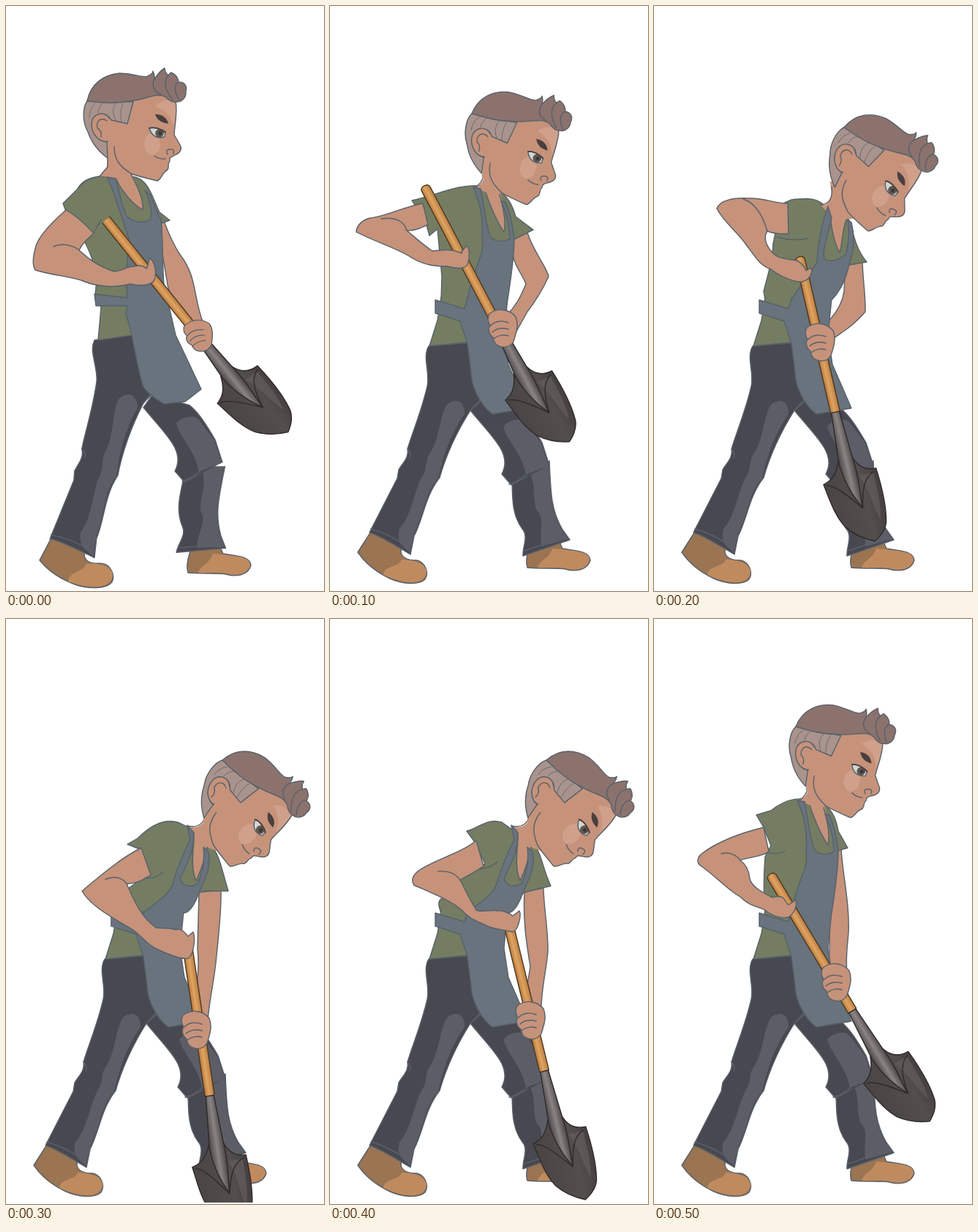
An HTML page without scripts that plays this animation: 435 px wide and 800 px high, repeating every 600 ms.

```html
<!DOCTYPE html>
<html lang="en">
<head>
<meta charset="utf-8">
<title>Digging man</title>
<style>
html, body { margin: 0; width: 100%; height: 100%; overflow: hidden; background: #fff; }
svg { display: block; width: 100vw; height: 100vh; }
path, rect { stroke: #57616a; stroke-width: 1.4; stroke-linejoin: round; stroke-linecap: round; }
.skin { fill: #c6927a; }
.shirt { fill: #747d62; }
.apron { fill: #68737d; }
.dark { fill: #484850; }
.lite { fill: #5d5d67; }
.boot { fill: #9b7452; }
.toe { fill: #c08a5f; }
.line { fill: none; }
.thin { stroke-width: .7; }
.lid { stroke: #4a3f3f; stroke-width: 1.8; }
.iron { stroke: #2f2a2a; }
.stick { stroke: #4a3823; }
.flat { stroke: none; }
.pose { visibility: hidden; animation: show .6s step-end infinite; animation-delay: calc((var(--i) - 6) * 100ms); }
@keyframes show {
  0% { visibility: visible; }
  16.66%, 100% { visibility: hidden; }
}
</style>
</head>
<body>
<svg viewBox="0 0 435 800" preserveAspectRatio="none">
<defs>
  <linearGradient id="wood">
    <stop offset="0" stop-color="#b9783c"/><stop offset=".45" stop-color="#dfa563"/><stop offset="1" stop-color="#bd7d40"/>
  </linearGradient>
  <linearGradient id="shaft">
    <stop offset="0" stop-color="#4a4545"/><stop offset=".5" stop-color="#8b8484"/><stop offset="1" stop-color="#494343"/>
  </linearGradient>
  <linearGradient id="steel">
    <stop offset="0" stop-color="#4a4545"/><stop offset=".7" stop-color="#534d4c"/><stop offset="1" stop-color="#453f3f"/>
  </linearGradient>

  <g id="head">
    <path class="skin flat" d="M135 150L168 120H228L232 130C235 145 231 160 230 176L238 190C241 195 239 200 233 203C228 206 223 206 224 212C220 216 224 219 221 224C213 228 213 237 207 239C195 236 180 233 169 229L140 212Z"/>
    <path class="flat" fill="#d0a08b" d="M204 137C212 129 222 127 231 130C234 145 231 155 229 166C226 150 218 143 204 137Z"/>
    <ellipse cx="200" cy="189" rx="11" ry="15" fill="#d0a08b"/>
    <path class="line" d="M232 130C235 145 231 160 230 176L238 190C241 195 239 200 233 203C228 206 223 206 224 212C220 216 224 219 221 224C213 228 213 237 207 239C195 236 180 233 171 229C155 219 148 210 148 192"/>
    <path fill="#a9938c" d="M111 130C104 140 105 160 112 172C118 190 128 200 139 208L138 186C125 185 115 172 118 156C124 146 136 146 141 152L144 156L166 161L174 131Z"/>
    <path class="line thin" d="M122 133q-8 7-8 20M132 133q-6 6-6 13M150 133q-7 10 0 23M160 133q-5 12-2 25"/>
    <path class="skin" d="M141 153C133 143 119 147 117 160C116 175 128 187 139 185"/>
    <path class="line" d="M138 157C129 151 123 158 125 167C129 169 131 174 130 179"/>
    <path fill="#8b726d" d="M111 130C116 105 135 94 155 92C175 92 188 99 194 96C199 93 201 92 201 89C204 94 203 97 203 100C207 94 211 88 217 85C217 90 220 93 222 95Q224 92 226 91C235 95 236 102 236 104C245 104 248 110 246 117C247 126 239 132 233 131C226 133 221 127 218 124C205 118 195 127 170 130C150 134 125 132 111 130Z"/>
    <path class="line" d="M203 100C198 112 205 118 212 121M222 95C214 105 220 118 228 128M236 104C229 108 231 120 237 128"/>
    <path class="flat" fill="#4a3f3f" d="M204 148C213 148 220 152 222 161C214 160 207 157 204 148Z"/>
    <path fill="#d5d6d2" d="M196 167C201 165 212 168 218 172L217 179C206 182 199 177 196 167Z"/>
    <circle cx="210" cy="174" r="5.8" fill="#5d5650"/><circle cx="211" cy="174" r="2.4" fill="#3a3635"/>
    <path class="line lid" d="M196 167C203 165 212 168 218 173"/>
    <path class="line" d="M221 203q-4-6 3-7q7-1 5 6M203 205q7 5 15 4"/>
  </g>

  <g id="shovel">
    <rect class="stick" x="-6.500" y="0" width="13" height="221" rx="5" fill="url(#wood)"/>
    <path class="iron" fill="url(#steel)" d="M-38 311C-26 308 -18 302 -11 284H9C14 299 25 305 37 305C39 330 39 360 34 380C30 392 20 398 13 402C0 396 -12 388 -22 374C-33 355 -34 335 -38 311Z"/>
    <path class="flat" fill="#6a6261" opacity=".6" d="M12 310L32 310C32 335 33 355 27 375C20 350 22 330 12 310Z"/>
    <path class="iron" fill="url(#shaft)" d="M-5.500 218H5.500L9 285C12 310 8 330 7 354C-2 335 -9 318 -11 290Z"/>
    <path class="line iron" d="M-34 313C-22 316 -8 335 7 354M33 309C18 314 12 330 7 354"/>
  </g>

  <g id="fist">
    <path class="skin" d="M-18 -20C-8 -28 8 -28 18 -16C23 -4 18 8 15 18C10 26 2 27 -5 24C-10 22 -12 18 -13 12C-19 8 -20 0 -17 -4C-21 -10 -20 -16 -18 -20Z"/>
    <path class="line" d="M-16 -4C-10 -11 0 -11 8 -8M-14 5C-7 -1 1 -1 8 1M-12 14C-6 9 2 8 8 10"/>
  </g>

  <g id="rear">
    <path class="boot" d="M60 712L54 722L38 747C50 765 65 775 82 783C100 791 122 792 130 784C136 775 130 760 118 758C108 758 98 755 97 746L100 730Z"/>
    <path class="toe flat" d="M73 778C75 764 95 768 98 757C115 757 133 763 132 775C128 792 105 792 73 778Z"/>
    <path class="dark" d="M135 465L196 460L205 520L207 540L192 553C175 580 160 610 150 645C130 670 128 700 115 725L110 750C90 738 70 725 54 720L92 646L94 634C100 624 108 618 106 606C112 585 125 555 133 520C137 500 126 480 135 465Z"/>
    <path class="lite flat" d="M160 545C172 535 185 540 184 558C165 585 155 615 148 646C130 665 130 690 115 722L109 748C100 738 90 735 95 715C110 700 115 665 125 645C135 632 128 622 138 610C150 590 150 560 160 545Z"/>
    <path class="line" d="M106 606q6 6 3 12M56 715q28 8 53 27M192 553l14-15"/>
  </g>

  <g id="shoe">
    <path class="boot" d="M275 728L272 742C268 755 268 762 270 768C290 770 310 768 322 770C335 774 352 772 356 758C355 745 335 745 318 742L310 724Z"/>
    <path class="toe flat" d="M284 768C288 756 300 756 304 742L318 743C335 746 355 745 355 758C350 772 335 772 322 769C308 767 296 769 284 768Z"/>
  </g>
  <g id="shin">
    <path class="dark" d="M300 622C302 670 303 690 318 716L328 730L264 752C263 740 272 725 263 715C248 695 250 670 249 652L246 635"/>
    <path class="lite flat" d="M267 630L299 622C302 670 302 690 317 716L326 729L290 739C285 720 295 700 283 690C275 670 285 650 267 630Z"/>
    <path class="line" d="M266 745q30-10 56-21"/>
  </g>
  <g id="thigh">
    <path class="dark" d="M271 643L248 655L235 640C250 612 222 590 192 553L205 535L255 550C268 560 280 580 290 597L300 628"/>
    <path class="lite flat" d="M237 575C245 565 262 562 268 570L289 598L299 629L268 641C262 610 245 600 237 575Z"/>
    <path class="line" d="M245 654q16-5 26-16"/>
  </g>
  <g id="legs"><use href="#shoe"/><use href="#shin"/><use href="#thigh"/><use href="#rear"/></g>

  <g id="waist">
    <path class="shirt" d="M152 398L147 430L136 465L188 460L205 398"/>
    <path class="apron" d="M188 400L184 414L144 402V420L178 431L188 462L193 500C193 520 205 545 222 558L270 550L244 490L238 450L243 400"/>
  </g>

  <g id="bib">
    <path class="skin flat" d="M208 200L212 225C212 237 208 242 200 248L213 255C220 275 228 295 238 309C241 295 238 275 232 250Z"/>
    <path class="line" d="M210 208C212 232 210 240 200 247M213 255C220 275 228 295 238 309C241 295 237 275 232 258"/>
    <path class="apron" d="M188 402C190 385 196 370 203 350C210 335 209 325 208 318C210 290 206 270 196 248L206 250C212 280 213 300 219 314C225 325 240 322 246 318C246 300 240 280 234 267L240 268C247 285 250 300 252 318C252 345 247 375 243 402"/>
  </g>
  <g id="bibLow">
    <path class="skin flat" d="M270 258L275 270C270 282 262 288 247 283L258 297C258 320 253 335 260 358C266 345 272 325 275 312L290 318V260Z"/>
    <path class="line" d="M272 265C273 280 262 286 248 283M256 297C256 320 252 338 260 358C266 345 273 325 275 312"/>
    <path class="apron" d="M188 402C200 390 222 380 228 362C236 335 245 315 252 302L248 282L257 292C258 315 248 335 238 355C242 368 255 366 262 362C270 345 272 330 270 312L277 318C282 340 270 360 264 374C258 392 250 402 243 402"/>
  </g>
  <use id="headMid" href="#head" transform="translate(83 17) rotate(10.500 111 130)"/>
  <use id="headLow" href="#head" transform="translate(185 63) rotate(37.500 111 130)"/>
</defs>

<g class="pose" style="--i:0">
  <path class="skin" d="M207 297L216 294C222 310 228 325 238 340C262 370 256 400 270 434L248 440C235 415 222 395 220 375L214 340Z"/>
  <use href="#shoe" transform="translate(-21 7)"/>
  <use href="#shin" transform="translate(-4 0) rotate(14 270 640)"/>
  <use href="#thigh" transform="translate(-4 -4)"/>
  <use href="#rear" transform="translate(121 457) rotate(-5) scale(1.04) translate(-135 -465)"/>
  <path class="shirt" d="M128 233C112 235 103 240 98 250L104 316C112 330 122 350 124 375L122 395L130 412L126 457L174 450L210 400L207 299L224 293L210 282C200 262 195 235 172 233Z"/>
  <path class="skin flat" d="M138 204V220L128 232L150 236C160 255 172 270 187 279C188 262 180 248 170 224Z"/>
  <path class="line" d="M139 208V220L128 233M150 236C160 255 172 270 187 279C188 262 180 248 171 230"/>
  <path class="apron" d="M138 234L150 236C156 255 158 275 165 287C178 299 192 296 198 291C200 280 196 265 190 252L197 258C203 270 205 282 212 291C215 320 214 360 216 380L232 450L267 524L245 541L216 544C200 535 190 525 187 519L180 490L172 450L164 420L166 410L123 410L121 394L166 399C162 370 168 330 168 318C155 280 147 250 138 234Z"/>
  <use href="#shovel" transform="translate(124.500 277) rotate(-38.700)"/>
  <path class="shirt flat" d="M128 233C108 236 102 245 98 250L78 270L82 281C95 285 110 300 119 312L129 298L141 289L142 245Z"/>
  <path class="line" d="M128 233C108 236 102 245 98 250L78 270L82 281C95 285 110 300 119 312L130 292"/>
  <path class="skin" d="M82 279C66 293 46 312 41 328C36 345 36 355 40 361C60 368 90 370 105 376C125 384 150 386 170 380C185 384 202 382 204 372C206 362 203 350 197 345C194 350 195 356 192 359C185 352 178 356 176 356C165 356 160 362 148 363C130 358 115 348 100 334C104 325 112 318 120 311C108 298 95 286 82 279Z"/>
  <path class="line" d="M65 329C75 324 90 326 100 334"/>
  <use href="#fist" transform="translate(264 451) rotate(-12) scale(.95 .85)"/>
  <use href="#head"/>
</g>

<g class="pose" style="--i:1">
  <path class="skin" d="M250 320L270 310C278 335 298 360 299 370C290 390 280 405 270 418L255 445L240 425C255 410 262 395 268 380C262 365 252 355 250 340Z"/>
  <use href="#legs"/>
  <path class="shirt" d="M152 402L153 370L147 305L136 314L131 296L112 266C150 257 175 244 203 246L236 256Q248 266 254 288L278 306L250 320L240 402"/>
  <use href="#waist"/><use href="#bib"/>
  <use href="#shovel" transform="translate(129 246) rotate(-27.700)"/>
  <path class="skin" d="M127 270C100 275 75 288 55 290C45 292 36 300 36 309C60 322 95 332 113 345C130 355 145 356 160 356C175 360 188 360 189 350C192 340 190 330 187 328C182 333 180 335 180 338C160 330 150 335 140 335C125 325 115 315 105 307C115 308 125 303 134 299Z"/>
  <path class="line" d="M70 291C90 288 102 295 105 307"/>
  <use href="#fist" transform="translate(236 441)"/>
  <use href="#headMid"/>
</g>

<g class="pose" style="--i:2">
  <use href="#legs"/>
  <path class="skin" d="M262 350L285 345C285 370 290 400 289 418C275 435 260 445 240 458L235 435C250 420 258 405 260 390Z"/>
  <path class="shirt" d="M152 402L150 390C155 370 162 350 163 325L166 310L172 272L188 265C210 262 225 262 236 276L265 288C272 305 274 330 291 350L262 355L240 402"/>
  <use href="#waist"/>
  <path class="skin flat" d="M241 240L243 258C240 268 235 274 228 272L240 285C242 300 247 325 254 337C258 325 257 305 262 292L280 290L268 240Z"/>
  <path class="line" d="M243 247C245 262 240 271 228 272M241 288C243 305 247 325 254 337C258 325 257 305 264 292"/>
  <path class="apron" d="M188 402C197 385 215 365 223 350C224 325 230 295 238 274L243 290C236 320 230 335 233 345C240 352 253 347 262 340C268 320 267 305 265 292L270 296C275 315 273 335 268 350C262 375 255 390 243 402"/>
  <use href="#shovel" transform="translate(199 343) rotate(-13)"/>
  <path class="skin" d="M183 270C165 270 150 262 130 263C110 262 90 265 86 277C95 295 115 310 125 325C140 345 145 355 160 360C175 372 195 378 203 377C212 375 218 365 215 358L208 362C204 352 198 348 190 347C178 346 168 345 160 335C152 325 150 315 155 308C165 312 178 312 184 311Z"/>
  <path class="line" d="M122 264C140 270 150 290 155 308M168 316q22 6 42 2"/>
  <use href="#fist" transform="translate(227 460)"/>
  <use href="#head" transform="translate(149 36) rotate(28.500 111 130)"/>
</g>

<g class="pose" style="--i:3">
  <use href="#legs"/>
  <path class="skin" d="M264 374L294 370C295 400 290 440 287 470C284 500 278 520 276 550L250 545C262 510 265 480 262 450Z"/>
  <path class="shirt" d="M150 402L165 370L190 352L186 316L166 308L180 300C195 285 215 272 235 278L260 290L278 308C292 320 293 335 304 372L265 372L243 402"/>
  <use href="#waist"/><use href="#bibLow"/>
  <path class="apron flat" d="M143 420V402L152 385L185 400L190 432Z"/>
  <use href="#shovel" transform="translate(246.500 436.500) rotate(-8.500)"/>
  <rect class="flat" x="245" y="798" width="100" height="2" fill="#fff"/>
  <path class="skin" d="M185 313C160 325 130 350 104 372C115 392 145 408 165 420C185 430 190 445 210 453C225 460 240 466 250 464C258 455 259 435 256 428L249 434C240 422 235 424 232 425C220 421 212 424 205 422C185 408 175 385 165 362C180 362 190 355 198 350Z"/>
  <path class="line" d="M136 356C150 350 160 355 165 362M190 354q14 2 25-8"/>
  <use href="#fist" transform="translate(260 562)"/>
  <use href="#headLow"/>
</g>

<g class="pose" style="--i:4">
  <use href="#legs"/>
  <path class="skin" d="M266 373L292 368C292 390 299 430 298 455C296 480 290 500 289 530L262 532C270 505 272 490 274 475C268 440 264 410 266 373Z"/>
  <path class="shirt" d="M152 402C148 392 148 388 150 385L180 350L212 335L198 305L187 290C205 285 215 272 235 278L278 308C290 320 290 340 302 365L265 374L243 402"/>
  <use href="#waist"/><use href="#bibLow"/>
  <use href="#shovel" transform="translate(241.500 406.500) rotate(-13.700)"/>
  <path class="skin" d="M200 303C180 320 140 330 120 345C112 352 111 358 115 364C140 375 165 385 180 398C192 412 205 414 215 420C225 424 240 426 250 428C258 425 262 405 259 399L250 406C245 402 235 398 230 399C220 397 205 402 200 398C192 385 185 370 178 357C190 350 205 342 210 338Z"/>
  <path class="line" d="M148 345C162 344 172 348 178 357M205 342q16-2 24-10"/>
  <use href="#fist" transform="translate(274 549)"/>
  <use href="#headLow"/>
</g>

<g class="pose" style="--i:5">
  <use href="#legs"/>
  <path class="skin" d="M246 318L256 314C258 350 268 390 266 430C264 450 262 465 264 482L236 482C244 450 238 430 240 405Z"/>
  <path class="shirt" d="M152 402C150 380 150 350 152 325L160 310L150 285L140 268L160 262C175 250 190 245 203 246L236 256Q248 266 252 290L265 313L248 318L240 402"/>
  <use href="#waist"/><use href="#bib"/>
  <use href="#shovel" transform="translate(159 349) rotate(-31)"/>
  <path class="skin" d="M150 285C120 292 85 305 64 322C58 328 60 334 62 336C85 352 100 370 118 380C130 392 140 393 150 397C160 405 170 410 183 408C192 404 196 392 194 384L184 391C178 385 178 380 174 380C165 378 165 382 160 380C145 372 133 365 131 355C130 343 125 335 118 330C130 325 150 325 157 318Z"/>
  <path class="line" d="M92 321C102 318 112 322 118 330M155 319q14 4 24-2"/>
  <use href="#fist" transform="translate(249 497)"/>
  <use href="#headMid"/>
</g>
</svg>
</body>
</html>
```
